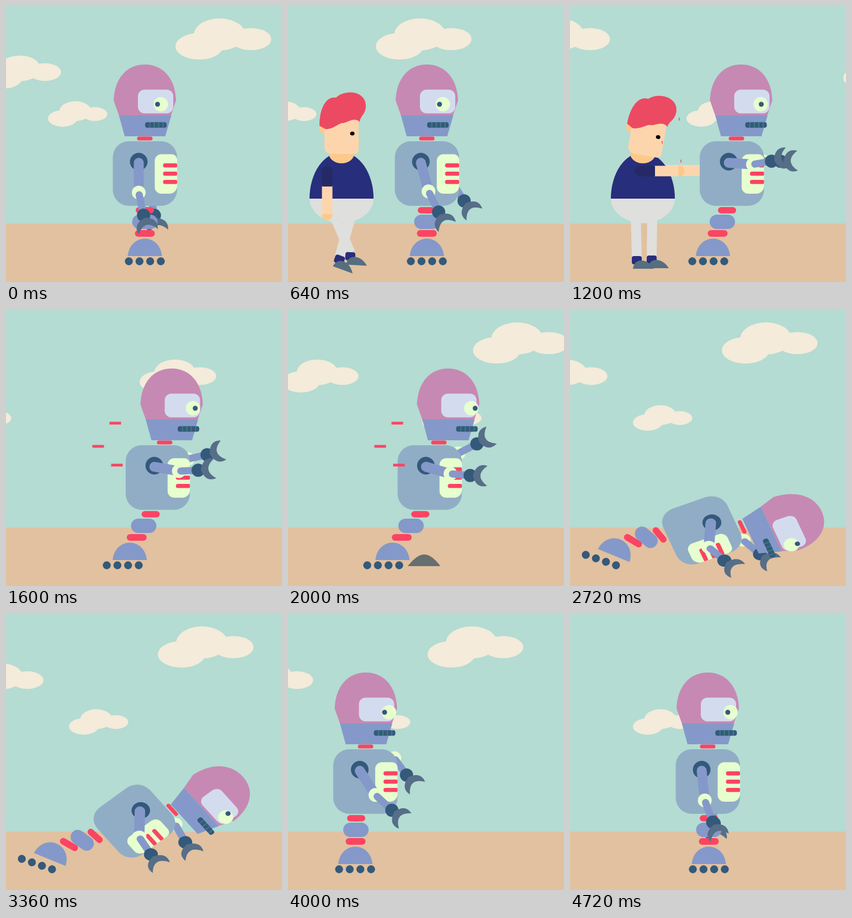
Write an HTML page with a canvas that moves like this. It is 500 px wide and 500 px high and loops after 4800 ms.

```html
<!DOCTYPE html>
<html>
<head>
<meta charset="utf-8">
<style>
html, body { margin: 0; width: 100%; height: 100%; overflow: hidden; background: #b4dcd2; }
canvas { display: block; width: 100vmin; height: 100vmin; }
</style>
</head>
<body>
<canvas id="stage" width="500" height="500"></canvas>
<script>
const c = document.getElementById('stage').getContext('2d');
const LOOP = 4800, STEP = 80, DEG = Math.PI / 180;
const SKY = '#b4dcd2', GROUND = '#e1c19f', CLOUD = '#f4ebda', PINK = '#c689b3', BLUE = '#8499c9',
  STEEL = '#91adc6', DARK = '#34597a', RED = '#fb4463', LIGHT = '#e7ffcf', VISOR = '#d3dcef',
  CLAW = '#566e87', SKIN = '#fdd5ad', TAN = '#fdc98b', HAIR = '#ec4a62', NAVY = '#272e7c',
  SLEEVE = '#252a66', PANTS = '#dfdfdd', SHOE = '#566e80', STONE = '#666e70', TEETH = '#3d7d84';

const lerp = (a, b, u) => a + (b - a) * u;
const ramp = (t, from, to) => Math.max(0, Math.min(1, (t - from) / (to - from)));
const wrap = (v, low, size) => low + (((v - low) % size) + size) % size;

// Piecewise linear motion; each key is [time, ...values].
function track(keys, t) {
  const next = keys.findIndex(key => key[0] > t);
  if (next < 0) return keys[keys.length - 1].slice(1);
  const a = keys[next - 1], b = keys[next], u = ramp(t, a[0], b[0]);
  return a.slice(1).map((v, k) => lerp(v, b[k + 1], u));
}

function shape(color, build) {
  c.fillStyle = color;
  c.beginPath();
  build();
  c.fill();
}
const oval = (x, y, rx, ry, color) => shape(color, () => c.ellipse(x, y, rx, ry, 0, 0, 7));
const disc = (x, y, r, color) => oval(x, y, r, r, color);
const box = (x, y, w, h, r, color) => shape(color, () => c.roundRect(x, y, w, h, r));
const pill = (w, h, color) => () => box(-w / 2, -h / 2, w, h, h / 2, color);
const rect = (x, y, w, h, color) => shape(color, () => c.rect(x, y, w, h));

function limb(x1, y1, x2, y2, width, color, cap = 'round') {
  c.strokeStyle = color;
  c.lineWidth = width;
  c.lineCap = cap;
  c.beginPath();
  c.moveTo(x1, y1);
  c.lineTo(x2, y2);
  c.stroke();
}

function place(x, y, angle, draw, squash = 0) {
  c.save();
  c.translate(x, y);
  c.scale(1 + .07 * squash, 1 - .08 * squash);
  c.rotate(angle * DEG);
  draw();
  c.restore();
}

// ---- scenery ----
const FAR_SCROLL = [[0, 0], [640, 148], [1200, 408], [2000, 914], [2240, 974], [3920, 974], [4640, 1174]];
const NEAR_SCROLL = [[0, 0], [640, 132], [1200, 515], [2000, 1133], [2240, 1262]];

function drawCloud(x, y, scale) {
  place(x, y, 0, () => {
    c.scale(scale, scale);
    oval(80, 0, 46.5, 29, CLOUD);
    oval(43, 21.5, 43, 24, CLOUD);
    oval(137, 8.5, 36.5, 20, CLOUD);
  });
}

function drawScenery(t) {
  rect(0, 0, 500, 500, SKY);
  rect(0, 394.5, 500, 106, GROUND);
  const far = track(FAR_SCROLL, t)[0], near = track(NEAR_SCROLL, t)[0];
  if (t <= 4640) {
    drawCloud(wrap(307 - far, -180, 942), 51.5, 1);
    drawCloud(wrap(-39 - far, -180, 942), 113, .8);
  }
  drawCloud(wrap(76 - near, -110, 650), 190.5, .62);
  if (t > 1680 && t < 2320) place(217 - (t - 2000) * 1.19, 464, 0, () => shape(STONE, () => {
    c.moveTo(0, 0);
    c.bezierCurveTo(22, -28, 38, -28, 59, 0);
  }));
}

function drawSpeedLines(t) {
  const w = 21 * ramp(t, 1185, 1385) * (1 - ramp(t, 2080, 2240));
  for (const [x, y] of [[198, 205], [167, 247], [201, 281]]) rect(x - w / 2, y - 2.5, w, 5, RED);
}

// ---- person ----
function drawLeg(hipX, footX, footY, tilt) {
  limb(hipX, 380, footX, footY - 4, 18, PANTS, 'butt');
  place(footX, footY, tilt, () => {
    box(-9, -5, 18, 15, 4, NAVY);
    shape(SHOE, () => {
      c.moveTo(-7, 18);
      c.bezierCurveTo(-5, -2, 19, -2, 31, 18);
    });
  });
}

function drawNearArm(length) {
  disc(length, 0, 9.5, TAN);
  rect(26, -9.5, length - 28, 19, SKIN);
  box(-9, -9.5, 37, 19, [9, 0, 0, 9], SLEEVE);
}

function drawPersonHead() {
  oval(-34, -46, 7, 8, TAN);
  box(-31, -80, 62, 80, [0, 0, 8, 12], SKIN);
  shape(HAIR, () => {
    c.moveTo(-29, -45);
    c.lineTo(-40, -51);
    c.bezierCurveTo(-40, -83, -28, -105, -10, -102);
    c.bezierCurveTo(4, -117, 43, -116, 44, -88);
    c.bezierCurveTo(44, -71, 34, -70, 33, -58);
    c.bezierCurveTo(24, -66, 16, -60, 4, -56);
    c.bezierCurveTo(-6, -57, -12, -45, -29, -45);
  });
  oval(19.5, -37, 4, 3.5, '#000');
}

function drawPerson(t) {
  const [x] = track([[0, -90], [640, 97], [1120, 132], [1200, 132], [1600, -140]], t);
  const reach = ramp(t, 640, 1120), armAngle = 90 * (1 - reach);
  const stride = t < 1120 ? Math.cos((t - 640) / 640 * 2 * Math.PI) : 0;
  place(x, 0, 0, () => {
    place(lerp(5, 18, reach), 298, armAngle, () => rect(0, -10, 86, 20, SKIN));
    drawLeg(17, 16 - 19 * stride, 457, 20 * stride);
    drawLeg(-13, -11 + 27 * stride, 458 - 7 * stride, 3 * stride);
    shape(PANTS, () => c.ellipse(0, 349, 58, 44, 0, 0, Math.PI));
    shape(NAVY, () => c.ellipse(0, 349, 58, 84, 0, Math.PI, 0));
    shape(TAN, () => c.ellipse(0, 267, 23, 18, 0, 0, Math.PI));
    place(2 * reach, 268 + 2.5 * reach, 10 * reach, drawPersonHead);
    place(lerp(-26, -6, reach), 299, armAngle, () => drawNearArm(lerp(80, 72, reach)));
  });
}

// ---- robot ----
// Wheel offset, sway per part above the wheels, extra offset of the upper body.
const SWAY = [[0, 0, 0, 0], [1040, 0, 0, 0], [1200, -1, 8.5, 0], [2000, -79, 16.8, 0], [2800, -79, 16.8, 0],
  [2801, -130, .5, 16], [4000, -130, .5, 16], [4720, 0, 0, -2]];

// Angles of near upper arm, near forearm, far upper arm, far forearm; turn of the face; pupil offset.
const LYING = [26, -23, -48, -24, 1, 2];
const POSES = [[0, 90, 78, 90, 80, 0, -6], [640, 75, 64, 45, 57, 0, -6], [1200, 4, -10, -5, 2, .5, 1],
  [2000, 16, 5, -30, -27, 1, 7], [2240, ...LYING], [2800, ...LYING], [4000, 57, 43, -28, 54, 1, -8],
  [4720, 84, 70, 92, 85, .95, -5]];

function drawArm(shoulderX, shoulderY, upper, fore) {
  const size = .8 + .2 * Math.abs(Math.sin(upper * DEG));
  const ex = shoulderX + 54 * size * Math.cos(upper * DEG), ey = shoulderY + 54 * size * Math.sin(upper * DEG);
  const wx = ex + 42 * size * Math.cos(fore * DEG), wy = ey + 42 * size * Math.sin(fore * DEG);
  limb(shoulderX, shoulderY, ex, ey, 18, BLUE);
  disc(ex, ey, 12.5, LIGHT);
  limb(lerp(ex, wx, .1), lerp(ey, wy, .1), wx, wy, 13, BLUE);
  disc(wx, wy, 12, DARK);
  place(wx, wy, fore - 4, () => shape(CLAW, () => {
    c.moveTo(31, -18);
    c.quadraticCurveTo(11, -24, 5, 0);
    c.quadraticCurveTo(11, 24, 31, 18);
    c.quadraticCurveTo(6, 0, 31, -18);
  }));
}

function drawRobotHead({ turn, pupil, fall }) {
  const eye = 29 + 13 * turn, mouth = 14 * turn;
  shape(PINK, () => {
    c.moveTo(-47, 28);
    c.lineTo(-56.5, 1);
    c.bezierCurveTo(-55, -40, -32, -64, 0, -64);
    c.bezierCurveTo(32, -64, 55, -40, 56.5, 1);
    c.lineTo(47.5, 28);
  });
  shape(BLUE, () => {
    c.moveTo(-47, 28);
    c.lineTo(48, 28);
    c.lineTo(37, 66);
    c.lineTo(-36.5, 66);
  });
  box(-12.5, -18.5, 64, 43, 12, VISOR);
  disc(eye, 8, 13, LIGHT);
  disc(eye + pupil, 8 - 10 * fall, 4.5, DARK);
  box(mouth + .5, 40.5, 39, 10, 4, DARK);
  for (let i = 0; i < 4; i++) rect(mouth + 8 + i * 8, 41, 2, 9, TEETH);
}

function drawTorso() {
  box(-58, -59, 116.5, 117, 29, STEEL);
  box(18, -35.5, 40.5, 71.5, [12, 10, 14, 12], LIGHT);
  for (let i = 0; i < 3; i++) box(33, -19 + 15 * i, 25.5, 7.5, [3.5, 2, 2, 3.5], RED);
}

function drawDome() {
  shape(BLUE, () => {
    c.moveTo(-31, 16);
    c.bezierCurveTo(-27, -26, 27, -26, 31, 16);
  });
}

function drawWheels() {
  for (let i = 0; i < 4; i++) disc((i - 1.5) * 19.3, 0, 7.2, DARK);
}

// Parts from the head down to the wheels, by upright height on the stage.
const PARTS = [
  { y: 170, draw: drawRobotHead },
  { y: 240, draw: pill(28, 7, RED) },
  { y: 304, draw: drawTorso },
  { y: 370, draw: pill(33, 11.5, RED) },
  { y: 391, draw: pill(46, 26, BLUE) },
  { y: 412, draw: pill(36, 12, RED) },
  { y: 437, draw: drawDome },
  { y: 462.5, draw: drawWheels }
];

// Lower parts land first and get up last; the lying body follows a curve along the ground.
function partPose({ y }, i, t, [wheels, sway, body]) {
  const height = 462.5 - y, s = Math.min(1, height / 158), bend = s * s * (3 - 2 * s);
  const rise = ramp(t, lerp(3360, 2880, bend), 3840);
  const fall = ramp(t, 2000, 2240 + 80 * bend) * (1 - rise * rise);
  const uprightX = 251.5 + wheels + sway * (7 - i) + (i < 3 ? body : 0);
  const lyingX = 56 + 1.15 * height;
  const lyingY = 453 - 40 * (1 - Math.exp(-height / 35)) - .09 * height;
  return {
    x: lerp(uprightX, lyingX, 1 - (1 - fall) ** 2),
    y: lerp(y, lyingY, fall),
    angle: (19 + 49 * bend) * fall,
    squash: i < 3 ? fall : 0,
    fall
  };
}

function drawRobot(t) {
  const settle = 1 - (1 - ramp(t, 4000, 4720)) ** 2;
  const sway = track(SWAY, t > 4000 ? 4000 + 720 * settle : t);
  const [nearUpper, nearFore, farUpper, farFore, turn, pupil] = track(POSES, t);
  const poses = PARTS.map((part, i) => partPose(part, i, t, sway));
  const inPose = ({ x, y, angle, squash }, draw) => place(x, y, angle, draw, squash);
  const torso = poses[2], shoulderX = -5 - 6 * Math.sin(nearUpper * DEG);

  inPose(torso, () => drawArm(10, -20, farUpper, farFore));
  for (const i of [7, 6, 5, 4, 3, 1, 0, 2])
    inPose(poses[i], () => PARTS[i].draw({ turn, pupil, fall: poses[i].fall }));
  inPose(torso, () => {
    disc(shoulderX, -22, 16, DARK);
    drawArm(shoulderX, -20, nearUpper, nearFore);
  });
}

const start = performance.now();
function tick() {
  const t = Math.floor(((performance.now() - start) % LOOP) / STEP) * STEP;
  drawScenery(t);
  drawPerson(t);
  drawRobot(t);
  drawSpeedLines(t);
  requestAnimationFrame(tick);
}
tick();
</script>
</body>
</html>
```
